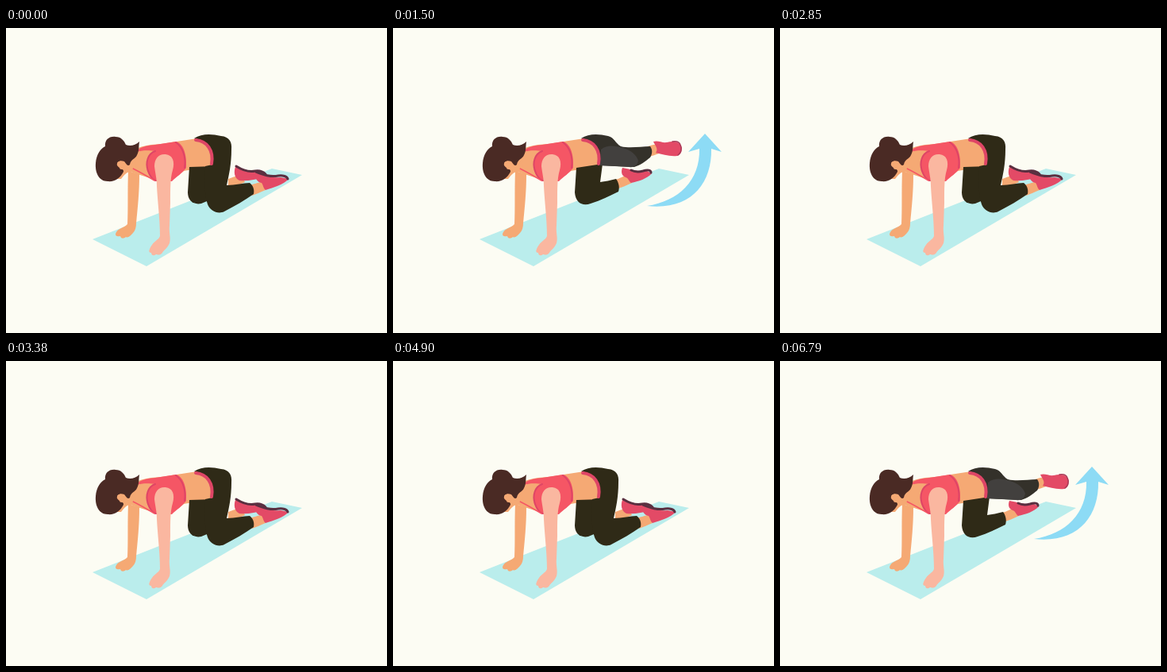
Recreate the animation shown at these times as an HTML page with a canvas. Size 480 px wide and 384 px high, loop 6.81 s.

```html
<!DOCTYPE html>
<html lang="en">
<head>
<meta charset="utf-8">
<title>Kneeling leg raise</title>
<style>
html, body { margin: 0; width: 100%; height: 100%; overflow: hidden; background: #fcfcf3; }
canvas { display: block; width: 480px; height: 384px; }
</style>
</head>
<body>
<canvas id="stage" width="480" height="384"></canvas>
<script>
const ctx = document.getElementById('stage').getContext('2d');
const LOOP = 6810;
const HOLD = LOOP / 6;

const C = {
  paper: '#fcfcf3', mat: '#baedec', arrow: '#8ddbf5',
  skin: '#f5a974', blush: '#fab7a0', hair: '#4a2a24',
  top: '#f55665', trim: '#de4566', legs: '#2f2a17', hip: '#34312a', thigh: '#42403e',
  shoe: '#e34a66', sole: '#5a2f40', edge: '#a83a58'
};

const fill = (color, d) => {
  ctx.fillStyle = color;
  ctx.fill(new Path2D(d));
};

const line = (color, width, d) => {
  ctx.strokeStyle = color;
  ctx.lineWidth = width;
  ctx.lineCap = 'round';
  ctx.stroke(new Path2D(d));
};

function mat() {
  fill(C.mat, 'M109 266 L335 177 L373 185 L177 300 Z');
}

function farArm() {
  fill(C.skin, 'M154 180 C153 205 154 228 153 247 C148 252 142 252 139 257 C136 262 141 263 144 262 C145 266 149 265 151 263 C154 265 157 261 160 258 C163 255 164 250 164 246 C166 225 168 207 168 184 Z');
}

function torso() {
  fill(C.skin, 'M152 160 C164 149 178 147 195 146 L241 139 C257 140 264 158 260 173 C248 178 234 178 224 180 L209 192 L187 191 L160 182 C153 180 150 172 152 160 Z');
  // sports top
  fill(C.top, 'M164 156 C168 150 176 148 188 147 L214 143 C223 145 228 158 227 176 C222 183 215 187 209 193 L188 193 C178 186 174 174 178 162 C181 157 185 156 188 155 C179 153 171 155 164 156 Z');
  fill(C.skin, 'M163 157 C171 153 180 154 186 156 C179 160 176 168 178 178 L164 177 Z');
  line(C.trim, 2, 'M188 155 C179 158 175 169 179 180 C181 186 185 191 189 192');
  line(C.trim, 2, 'M214 144 C223 150 227 163 225 176');
  line(C.top, 1.5, 'M160 177 C168 181 177 186 187 192');
}

function head() {
  fill(C.skin, 'M136 160 L160 158 C163 168 161 177 157 181 C152 181 149 185 145 190 L136 190 Z');
  fill(C.hair, 'M113 170 C114 159 119 152 125 149 C124 141 130 136 138 137 C145 137 149 142 151 147 C156 149 163 148 168 143 C167 149 168 155 165 160 C163 165 157 165 156 172 C153 175 151 170 149 168 C143 166 139 169 140 173 C143 178 149 177 148 181 C144 189 137 194 128 193 C117 193 112 182 113 170 Z');
  fill(C.skin, 'M140 170 C143 166 148 168 149 173 C150 178 146 179 143 177 C145 174 143 171 140 170 Z');
}

function nearArm() {
  fill(C.blush, 'M187 174 C187 164 193 158 201 159 C210 160 213 168 210 179 C207 189 207 201 207 220 L206 249 C205 257 208 264 206 271 C203 278 199 279 197 283 C194 287 190 285 189 285 C185 288 183 285 183 283 C178 283 181 277 184 273 C187 268 192 267 194 262 C194 241 191 219 190 199 C190 189 188 183 187 174 Z');
}

function waistband() {
  line(C.trim, 4, 'M239 141 C253 142 262 154 259 171');
}

function restingLegs() {
  // far leg
  fill(C.skin, 'M280 190 C287 188 291 185 297 186 L301 194 C294 198 286 199 280 199 Z');
  fill(C.shoe, 'M289 175 C296 176 304 183 319 180 L325 188 C314 191 304 193 294 192 C287 189 287 180 289 175 Z');
  line(C.sole, 3, 'M290 174 C298 179 305 182 314 180 C321 179 325 182 327 184');
  fill(C.legs, 'M231 175 L229 207 C229 217 236 223 246 221 L258 216 L264 174 Z');
  // near leg
  fill(C.skin, 'M305 198 C313 197 317 194 323 194 L327 204 C320 207 315 209 310 211 Z');
  fill(C.shoe, 'M314 182 C322 183 330 190 346 188 L356 190 C350 197 337 201 327 204 C324 202 324 197 322 195 C316 194 313 188 314 182 Z');
  line(C.sole, 3, 'M315 181 C325 185 333 188 343 186 C349 185 354 187 355 190');
  fill(C.legs, 'M237 139 C246 133 258 133 271 136 C281 137 285 143 284 153 C284 171 281 185 278 198 C289 198 299 195 307 195 C312 199 313 204 312 209 C301 217 288 224 275 231 C267 235 257 230 254 222 C249 208 251 190 251 174 L260 172 C263 157 255 141 237 139 Z');
  waistband();
}

function raisedLegs() {
  // supporting leg
  fill(C.skin, 'M279 191 C288 190 290 185 296 186 L301 195 C294 198 288 201 281 203 Z');
  fill(C.shoe, 'M289 176 C298 177 306 182 318 179 L326 183 C320 190 309 193 300 195 C297 193 297 189 293 188 C288 186 287 181 289 176 Z');
  line(C.sole, 3, 'M300 179 C306 182 311 181 315 180 C321 178 325 179 325 182');
  fill(C.legs, 'M231 176 L229 207 C230 220 239 225 249 221 C262 217 273 211 284 206 C286 200 284 194 281 190 C274 192 267 193 261 194 L264 171 Z');
  // lifted leg
  fill(C.skin, 'M321 149 C326 148 328 146 333 147 L335 158 C330 160 326 161 322 162 Z');
  fill(C.shoe, 'M328 143 C334 141 339 145 345 144 C353 142 360 143 363 148 C365 153 363 160 358 161 C348 162 340 159 331 157 C335 152 330 148 328 143 Z');
  line(C.edge, 1.5, 'M352 143 C358 142 361 144 362 147 C365 153 362 158 359 160');
  fill(C.hip, 'M237 139 C246 133 258 133 271 136 C279 138 280 145 287 149 C299 152 312 149 324 149 C327 153 327 158 324 163 C318 168 311 173 304 175 L260 173 C263 157 255 141 237 139 Z');
  fill(C.thigh, 'M262 153 C271 146 281 149 290 151 C300 154 307 160 309 167 C308 173 303 176 298 175 L261 173 Z');
  waistband();
}

function arrow() {
  fill(C.arrow, 'M320 224 C360 218 387 192 386 152 L372 156 L393 133 L414 156 L401 152 C402 197 374 230 320 224 Z');
}

function draw(t) {
  const raised = Math.floor(t % LOOP / HOLD) % 2 === 1;
  ctx.fillStyle = C.paper;
  ctx.fillRect(0, 0, 480, 384);
  mat();
  if (raised) arrow();
  farArm();
  torso();
  (raised ? raisedLegs : restingLegs)();
  head();
  nearArm();
}

const start = performance.now();
function tick() {
  draw(performance.now() - start);
  requestAnimationFrame(tick);
}
tick();
</script>
</body>
</html>
```
